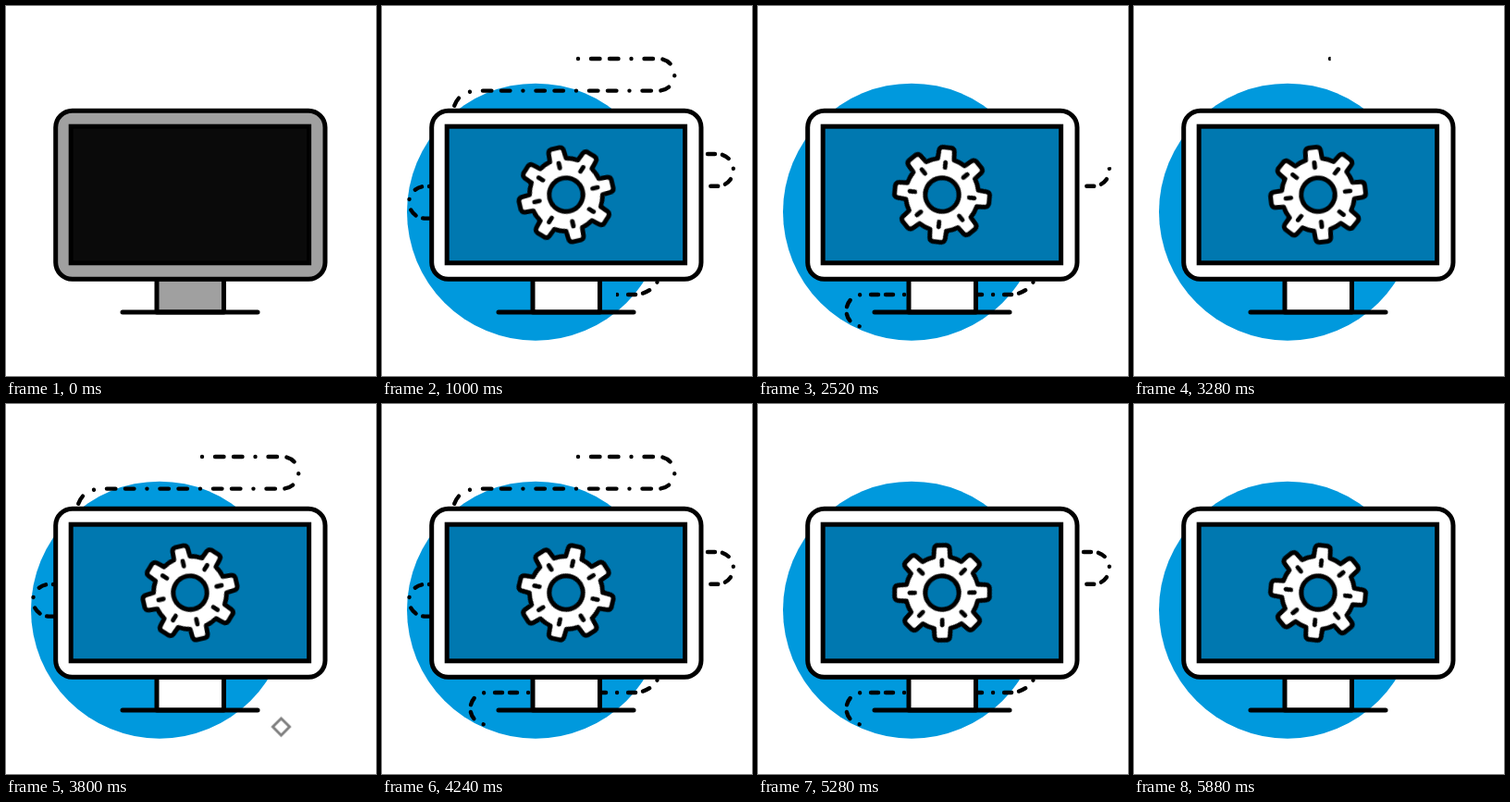
Animation of 400x400 px, one loop 5920 ms. Source, as an HTML page:

```html
<!DOCTYPE html>
<html lang="en">
<head>
<meta charset="utf-8">
<title>Computer settings</title>
<style>
  html, body { margin: 0; width: 100%; height: 100%; overflow: hidden; background: #fff; }
  svg { display: block; width: 100vw; height: 100vh; }

  .ink { fill: none; stroke: #000; stroke-width: 5; stroke-linecap: round; stroke-linejoin: round; }
  .dashes { fill: none; stroke: #000; stroke-width: 4.4; stroke-linecap: round; }
  .dashes path { stroke-dasharray: .01 12 8 8 8 12; }
  .dashes .top { stroke-dasharray: .01 14 9.5 10.5 9.5 14; }

  .anim { animation: 5920ms linear infinite; }
  #guide { fill: none; stroke: #fff; stroke-width: 12; stroke-dasharray: 1 2; animation-name: trace; }
  #disc { fill: #0099dd; transform-origin: 137px 362px; animation-name: disc; }
  .case { animation-name: case; }
  .screen { animation-name: screen; }
  #pop { animation-name: pop; }
  #spin { animation-name: spin; }

  /* the line draws itself, then is wiped from its start, twice per loop */
  @keyframes trace {
    0%, .642% { stroke-dashoffset: 1; }
    19.865%, 29.51% { stroke-dashoffset: 0; }
    48.733% { stroke-dashoffset: -1; }
    48.734%, 55.372% { stroke-dashoffset: 1; }
    69.324%, 77.483% { stroke-dashoffset: 0; }
    96.706%, 100% { stroke-dashoffset: -1; }
  }
  @keyframes disc {
    0%, 10.473% { transform: scale(0); animation-timing-function: ease-out; }
    14.189% { transform: scale(1.19); animation-timing-function: ease-in-out; }
    16.892%, 100% { transform: scale(1); }
  }
  @keyframes pop {
    0%, 10.473% { transform: scale(0); animation-timing-function: ease-out; }
    14.189% { transform: scale(1.1); animation-timing-function: ease-in-out; }
    16.892%, 100% { transform: scale(1); }
  }
  @keyframes case {
    0%, 10.473% { fill: #a0a0a0; }
    13.514%, 100% { fill: #fff; }
  }
  @keyframes screen {
    0%, 10.473% { fill: #0a0a0a; }
    13.514%, 100% { fill: #0078b0; }
  }
  @keyframes spin {
    from { transform: rotate(-264deg); }
    to { transform: rotate(687.4deg); }
  }
</style>
</head>
<body>
<svg viewBox="0 0 400 400">
  <defs>
    <mask id="reveal" maskUnits="userSpaceOnUse" x="0" y="0" width="400" height="400">
      <path id="guide" class="anim" pathLength="1" d="M208 57H299a17.3 17.3 0 0 1 0 34.6H105C90 91.6 80 98 77 112
        L60 195H46.5a17.3 17.3 0 0 0 0 34.6H60L340 160H362.5a17.3 17.3 0 0 1 0 34.8H340
        L302 285C300 302 288 312 272 312H112.8a17.3 17.3 0 0 0 0 34.6H117"/>
    </mask>
  </defs>

  <circle id="disc" class="anim" cx="166" cy="222.7" r="139"/>

  <g class="dashes" mask="url(#reveal)">
    <path class="top" stroke-dashoffset="-1.5" d="M210.5 57H299a17.3 17.3 0 0 1 0 34.6H105C90 91.6 80 98 77 112"/>
    <path stroke-dashoffset="-37" d="M60 195H46.5a17.3 17.3 0 0 0 0 34.6H60"/>
    <path stroke-dashoffset="-48" d="M340 160H362.5a17.3 17.3 0 0 1 0 34.8H340"/>
    <path stroke-dashoffset="-254.5" d="M302 285C300 302 288 312 272 312H112.8a17.3 17.3 0 0 0 0 34.6H114"/>
  </g>

  <g class="ink">
    <rect class="anim case" x="163" y="295" width="72.5" height="36"/>
    <path d="M126 331H272"/>
    <rect class="anim case" x="53.7" y="113.2" width="291.3" height="182" rx="18"/>
    <rect class="anim screen" x="70.2" y="130.2" width="257.4" height="147.6" stroke-linejoin="miter"/>
  </g>

  <g transform="translate(199 204)">
    <g id="pop" class="anim">
      <g id="spin" class="anim ink">
        <path id="gear" fill="#fff"/>
        <path id="ticks" stroke-width="4.8"/>
        <circle r="18.2" fill="#0078b0"/>
      </g>
    </g>
  </g>

  <g fill="none" stroke="#000" stroke-width="3">
    <path id="upper" d="M0-9.5 9.5 0 0 9.5-9.5 0z"/>
    <path id="lower" d="M0-9.5 9.5 0 0 9.5-9.5 0z"/>
  </g>
</svg>
<script>
  const $ = id => document.getElementById(id);

  const polar = (r, deg) => {
    const a = deg * Math.PI / 180;
    return (r * Math.sin(a)).toFixed(2) + ' ' + (-r * Math.cos(a)).toFixed(2);
  };

  function buildGear() {
    let rim = '', ticks = '';
    for (let a = 0; a < 360; a += 45) {
      rim += (a ? `A39.5 39.5 0 0 1 ${polar(39.5, a - 13)}` : `M${polar(39.5, -13)}`)
        + `L${polar(48, a - 10)}Q${polar(51.5, a - 9)} ${polar(51.5, a - 5)}`
        + `L${polar(51.5, a + 5)}Q${polar(51.5, a + 9)} ${polar(48, a + 10)}`
        + `L${polar(39.5, a + 13)}`;
      ticks += `M${polar(29.5, a)}L${polar(35, a)}`;
    }
    $('gear').setAttribute('d', rim + `A39.5 39.5 0 0 1 ${polar(39.5, -13)}Z`);
    $('ticks').setAttribute('d', ticks);
  }

  const LOOP = 5920, PERIOD = 940, PULSE = 240;
  const diamonds = [
    { el: $('upper'), x: 158, y: 57.5, start: 1678 },
    { el: $('lower'), x: 297.5, y: 349, start: 1790 }
  ];

  // each diamond grows quickly and fades out
  function pulse({ el, x, y, start }, t) {
    const u = t < start ? 1 : Math.min(1, (t - start) % PERIOD / PULSE);
    const size = 1 - (1 - u) ** 4;
    const alpha = Math.max(0, Math.min(1, (0.85 - u) / 0.6));
    el.setAttribute('transform', `translate(${x} ${y}) scale(${size})`);
    el.setAttribute('opacity', alpha);
  }

  buildGear();
  const origin = performance.now();
  function frame(now) {
    const t = Math.max(0, now - origin) % LOOP;
    diamonds.forEach(d => pulse(d, t));
    requestAnimationFrame(frame);
  }
  frame(origin);
</script>
</body>
</html>
```
